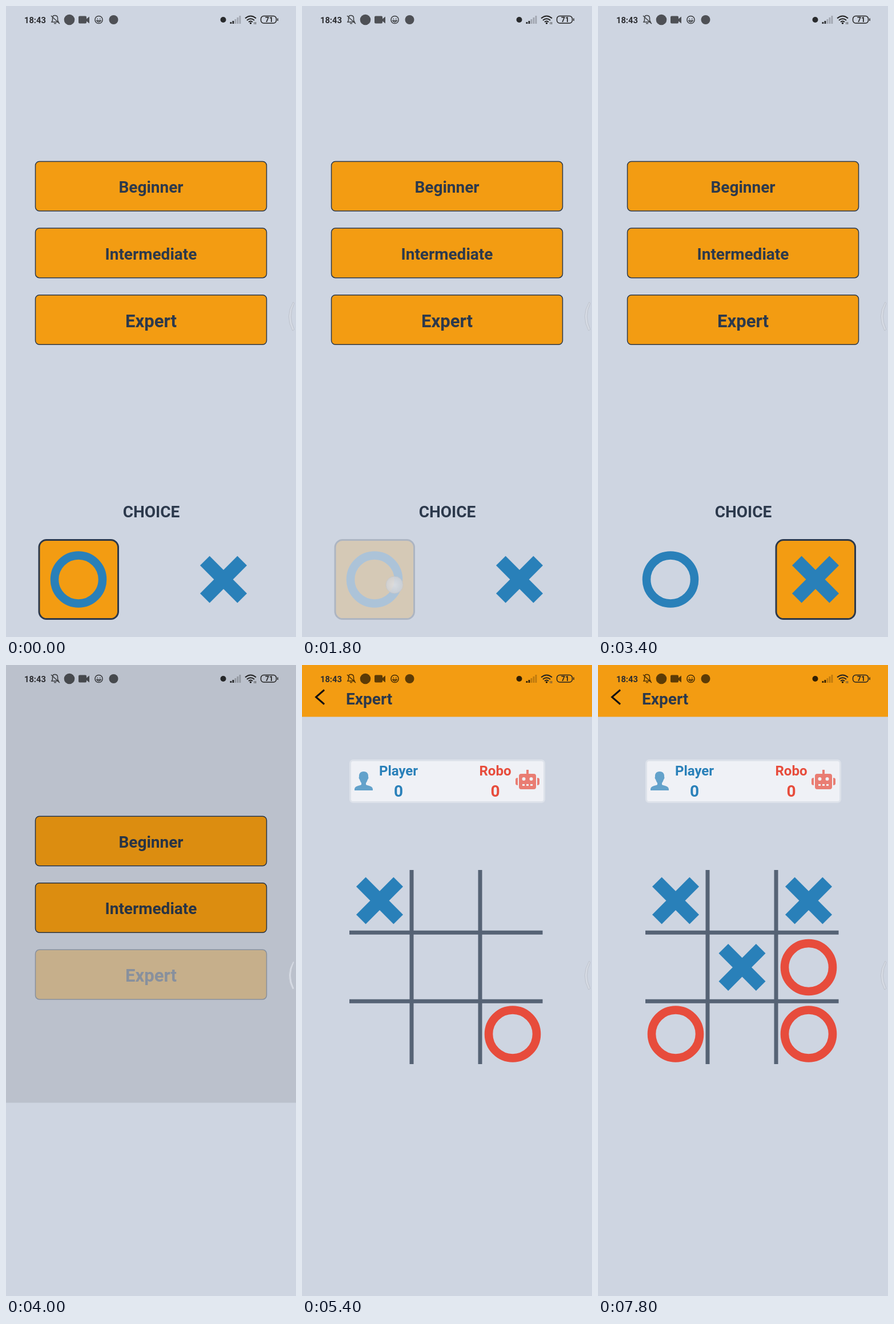
Recreate the animation shown at these times as an HTML page. Size 508 px wide and 1102 px high, loop 8 s.

```html
<!DOCTYPE html>
<html lang="en">
<head>
<meta charset="utf-8">
<title>Tic-tac-toe</title>
<style>
html, body { margin: 0; width: 100%; height: 100%; overflow: hidden; background: #ced5e1; }
svg { position: absolute; left: 0; top: 0; width: 100%; height: 100%; }
text { font-family: Roboto, "Noto Sans", sans-serif; font-weight: 700; font-size: 28px; fill: #2c394c; }
.mid { text-anchor: middle; }
.orange { fill: #f39c12; }
.blue { fill: #2980b9; }
.red { fill: #e74c3c; }
.edge { stroke: #2c394c; }
</style>
</head>
<body>
<svg viewBox="0 0 508 1102">
  <defs>
    <circle id="o" r="42" fill="none" stroke-width="14.6"/>
    <path id="x" d="M-32.7-32.7 32.7 32.7M32.7-32.7-32.7 32.7" fill="none" stroke-width="23.5"/>
    <radialGradient id="touch">
      <stop offset="0" stop-color="#e2e2e4"/>
      <stop offset="1" stop-color="#cfd1d5"/>
    </radialGradient>
  </defs>

  <g id="menu">
    <rect width="508" height="1130" fill="#ced5e1"/>
    <g id="levels"></g>
    <text class="mid" x="254.5" y="893">CHOICE</text>
    <g id="choices"></g>
  </g>
  <rect id="shade" width="508" height="1102"/>
  <circle id="dot" r="15" fill="url(#touch)" stroke="#c3c5ca" opacity=".8"/>

  <g id="game"><g id="card">
    <rect width="508" height="1102" fill="#ced5e1"/>
    <rect class="orange" width="508" height="90.5"/>
    <path d="M39 43.5 24.5 56 39 68.5" fill="none" stroke="#111" stroke-width="3"/>
    <text x="77" y="69">Expert</text>
    <rect x="84.5" y="166.5" width="340" height="73" rx="5" fill="#eff1f6" stroke="#dde2ea" stroke-width="3"/>
    <g font-size="24">
      <text class="blue mid" x="169" y="193" style="font-size:24px">Player</text>
      <text class="red mid" x="338.5" y="193" style="font-size:24px">Robo</text>
    </g>
    <text class="blue mid" x="169" y="230">0</text>
    <text class="red mid" x="338.5" y="230">0</text>
    <path class="blue" opacity=".7" d="M108 186c6 0 8.500 4 8 9 1 2 0 4-1 5-1 3-2 5-3 6v3c3 2 12 2 12 8v2H92v-2c0-6 9-6 12-8v-3c-1-1-2-3-3-6-1-1-2-3-1-5-.5-5 2-9 8-9z"/>
    <path class="red" opacity=".7" fill-rule="evenodd" d="M393 183h4v7h9q4 0 4 4v19q0 4-4 4h-22q-4 0-4-4v-19q0-4 4-4h9z
      M385.500 199a3 3 0 1 0 6 0 3 3 0 1 0-6 0zM398.500 199a3 3 0 1 0 6 0 3 3 0 1 0-6 0z
      M386 208h4v3h-4zM393 208h4v3h-4zM400 208h4v3h-4zM378 197v13q-4 0-4-3v-7q0-3 4-3zM412 197v13q4 0 4-3v-7q0-3-4-3z"/>
    <path d="M192 358V697M312 358V697M83 467.300H421.500M83 587.300H421.500" stroke="#566375" stroke-width="7"/>
    <g id="moves"></g>
  </g></g>

  <path d="M503 517Q488 542 502 567L505 565Q494 542 505 519Z" fill="#d5dae3" stroke="#b9bec8" stroke-width=".8"/>

  <g id="status">
    <text x="32" y="29.500" style="font-size:14.700px;fill:#2b2c30">18:43</text>
    <g fill="none" stroke="#000" stroke-opacity=".7" stroke-width="1.500">
      <path d="M80 28h12l-1.500-3v-4q0-4-4.500-4.500t-4.500 4.500v4zM84 30.500h4M79 17l15 14"/>
      <circle cx="162.500" cy="24" r="6.600"/>
      <path d="M159 25.500q3.500 5 7 0zM159.500 22.500h1.500M164 22.500h1.500"/>
    </g>
    <g opacity=".62">
      <circle cx="111" cy="24" r="9.300"/>
      <path d="M129 17.500h10q2 0 2 2v3l5-4v12l-5-4v2q0 2-2 2h-10q-2 0-2-2v-9q0-2 2-2z"/>
      <circle cx="188.500" cy="24" r="8"/>
    </g>
    <circle cx="380.500" cy="24" r="5" opacity=".8"/>
    <g id="bars"></g>
    <g fill="none" stroke="#222" stroke-width="2">
      <path d="M419 21.500q9.500-8 19 0M422 25q6.500-5.500 13 0M425 28q3.500-3 7 0"/>
      <rect x="446.500" y="17.500" width="27" height="12.500" rx="5" stroke-width="1.500"/>
      <path d="M476 21.500v4.500" stroke-width="1.500"/>
    </g>
    <circle cx="428.500" cy="30" r="1.600"/>
    <path d="M435 28v4M437.500 28v4" stroke="#444"/>
    <text class="mid" x="461" y="28" style="font-size:12px;fill:#222">71</text>
  </g>
</svg>
<script>
const $ = id => document.getElementById(id);
const LOOP = 8000, STEP = 200, HEIGHT = 1102;
const BLUE = "#2980b9", RED = "#e74c3c";
const mark = (kind, x, y, color) => `<use href="#${kind}" x="${x}" y="${y}" stroke="${color}"/>`;

const levels = [["Beginner", 28, 326], ["Intermediate", 28, 442.5], ["Expert", 31, 560.5]];
$("levels").innerHTML = levels.map(([name, size, base], i) => `<g>
  <rect class="orange edge" x="51.5" y="${271.5 + i * 116.6}" width="405" height="86.600" rx="7" stroke-width="1.500"/>
  <text class="mid" x="254" y="${base}" style="font-size:${size}px">${name}</text></g>`).join("");

$("choices").innerHTML = [["o", 127], ["x", 381]].map(([kind, x]) => `<g>
  <rect class="orange edge" x="${x - 69}" y="932.5" width="138.500" height="138" rx="13" stroke-width="3"/>
  ${mark(kind, x, 1001.5, BLUE)}</g>`).join("");

$("bars").innerHTML = [3, 5, 8, 11, 14].map((h, i) =>
  `<rect x="${392.5 + i * 4}" y="${31 - h}" width="2.800" height="${h}" opacity="${i < 2 ? 0.8 : 0.22}"/>`).join("");

// time, mark, column, row
const moves = [
  [4800, "x", 0, 0], [5200, "o", 2, 2],
  [6000, "x", 1, 1], [6400, "o", 2, 1],
  [7000, "x", 2, 0], [7400, "o", 0, 2]
];
$("moves").innerHTML = moves.map(([, kind, col, row]) =>
  mark(kind, 136 + col * 116.5, 411.5 + row * 116.5, kind === "x" ? BLUE : RED)).join("");

// release time, choice, touch position
const taps = [[800, 1, 379, 996], [1800, 0, 162, 1011], [2800, 1, 380, 1000]];
const EXPERT_TAP = 3926, OPEN = 3959;

const clamp = v => Math.min(1, Math.max(0, v));
const inOut = u => u < 0.5 ? 2 * u * u : 1 - 2 * (1 - u) ** 2;

// opacity dips to 0.2 during a press and recovers after release
function pressed(t, release) {
  const down = inOut(clamp((t - release + 150) / 150));
  const up = inOut(clamp((t - release) / 250));
  return 1 - 0.8 * (down - up);
}

function draw(t) {
  let selected = 0;
  const fade = [1, 1];
  $("dot").style.display = "none";
  for (const [time, choice, x, y] of taps) {
    if (t >= time) selected = choice;
    fade[choice] *= pressed(t, time);
    if (t >= time - 150 && t < time + 100) {
      $("dot").style.display = "";
      $("dot").setAttribute("cx", x);
      $("dot").setAttribute("cy", y);
    }
  }
  [...$("choices").children].forEach((group, i) => {
    group.style.opacity = fade[i];
    group.firstElementChild.style.display = i === selected ? "" : "none";
  });
  $("levels").lastElementChild.style.opacity = pressed(t, EXPERT_TAP);

  // the game screen is revealed from below while the menu drifts up and darkens
  const p = 1 - (1 - clamp((t - OPEN) / 425)) ** 4;
  const top = HEIGHT * (1 - p);
  $("menu").setAttribute("transform", `translate(0 ${-0.02 * HEIGHT * p})`);
  $("shade").style.opacity = 0.1 * clamp(p / 0.36);
  $("game").style.display = p > 0 ? "" : "none";
  $("game").style.clipPath = `polygon(0 ${top}px, 508px ${top}px, 508px 1102px, 0 1102px)`;
  $("card").setAttribute("transform", `translate(0 ${0.041 * top})`);
  moves.forEach(([time], i) => $("moves").children[i].style.display = t >= time ? "" : "none");
}

const start = performance.now();
function tick() {
  const t = (performance.now() - start) % LOOP;
  draw(Math.floor(t / STEP) * STEP);
  requestAnimationFrame(tick);
}
tick();
</script>
</body>
</html>
```
